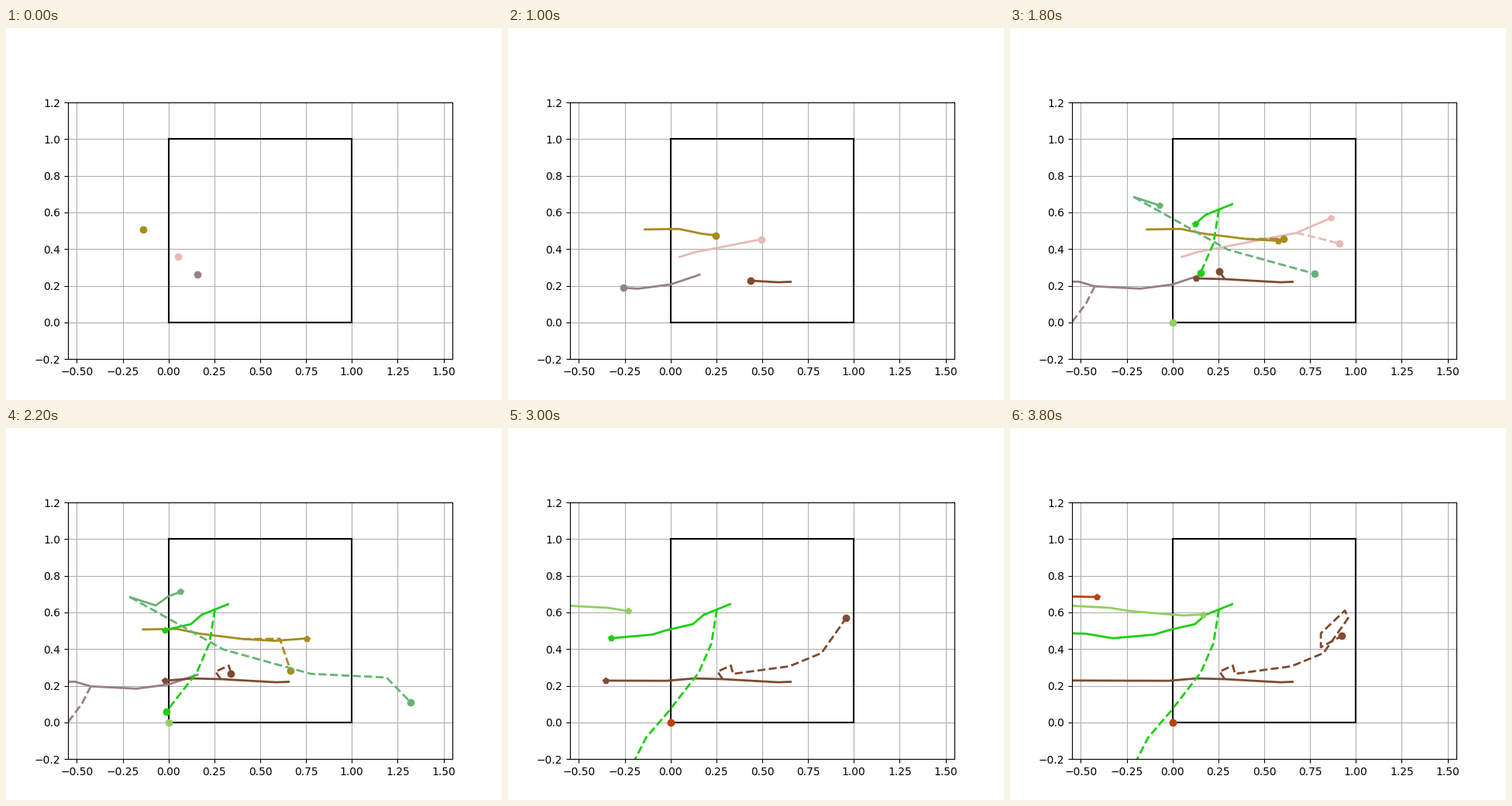
Write a matplotlib script that moves like this. It is 640 px wide and 480 px high and loops after 4 s.

```python
import numpy as np
import matplotlib.pyplot as plt
from matplotlib.animation import FuncAnimation

FRAMES, INTERVAL = 20, 200
FORK = 7                # last step before the forecast starts

fig, ax = plt.subplots(figsize=(6.4, 4.8), dpi=100)
fig.subplots_adjust(top=0.8)

# equal scale on both axes, centred on the unit square
box = ax.get_position()
half = 0.7 * (box.width * 6.4) / (box.height * 4.8)
ax.set_xlim(0.5 - half, 0.5 + half)
ax.set_ylim(-0.2, 1.2)
ax.grid(True)
for a, b in [((0, 1), (0, 0)), ((0, 1), (1, 1)), ((0, 0), (0, 1)), ((1, 1), (0, 1))]:
    ax.plot(a, b, color="black")


def trace(knots, first, last):
    """Positions at every step, at even speed between (step, x, y) knots."""
    t, x, y = zip(*knots)
    steps = np.arange(first, last + 1)
    return np.interp(steps, t, x), np.interp(steps, t, y)


class Walker:
    """A walked path (solid) and its forecast (dashed)."""

    def __init__(self, color, born, gone, path, forecast=()):
        self.born, self.gone, self.path = born, gone, path
        if born <= FORK:
            x, y = trace(path, FORK, FORK)
            self.forecast = [(FORK, x[0], y[0]), *forecast]
        else:
            self.forecast = [(born, 0, 0)]
        style = dict(color=color, lw=2, markevery=[-1], visible=False)
        self.solid, = ax.plot([0], [0], "-", **style)
        self.dashed, = ax.plot([0], [0], "--", marker="o", **style)

    def show(self, step):
        alive = self.born <= step < self.gone
        ahead = step > FORK
        self.solid.set_visible(alive)
        self.dashed.set_visible(alive and ahead)
        if alive:
            self.solid.set_data(*trace(self.path, self.born, step))
            self.solid.set_marker("p" if ahead else "o")
            self.dashed.set_data(*trace(self.forecast, FORK, max(step, FORK)))
        return [self.solid, self.dashed]


walkers = [
    Walker("#e6bab8", 0, 10,
           [(0, 0.05, 0.357), (1, 0.137, 0.384), (7, 0.675, 0.488), (9, 0.865, 0.57)],
           [(8, 0.758, 0.469), (9, 0.911, 0.43)]),
    Walker("#988089", 0, 12,
           [(0, 0.158, 0.26), (2, 0, 0.207), (4, -0.176, 0.184),
            (7, -0.424, 0.197), (8, -0.51, 0.222), (11, -0.77, 0.222)],
           [(8, -0.472, 0.103), (11, -0.8, -0.335)]),
    Walker("#a88c1e", 0, 12,
           [(0, -0.14, 0.507), (2, 0.044, 0.51), (4, 0.17, 0.484),
            (7, 0.405, 0.455), (9, 0.578, 0.445), (11, 0.752, 0.458)],
           [(9, 0.607, 0.456), (11, 0.666, 0.281)]),
    Walker("#804a30", 2, FRAMES,
           [(2, 0.655, 0.2215), (3, 0.587, 0.219), (7, 0.285, 0.236),
            (9, 0.13, 0.24), (11, -0.022, 0.227), (15, -0.355, 0.228),
            (19, -0.66, 0.229)],
           [(9, 0.256, 0.277), (10, 0.329, 0.31), (11, 0.341, 0.265),
            (13, 0.648, 0.306), (14, 0.823, 0.378), (15, 0.958, 0.569),
            (16, 0.94, 0.61), (17, 0.809, 0.486), (18, 0.809, 0.41),
            (19, 0.924, 0.472)]),
    Walker("#1ece14", 6, FRAMES,
           [(6, 0.325, 0.645), (8, 0.181, 0.587), (9, 0.122, 0.536),
            (11, -0.022, 0.503), (12, -0.1, 0.479), (15, -0.325, 0.459),
            (17, -0.476, 0.484), (19, -0.63, 0.488)],
           [(8, 0.223, 0.431), (9, 0.154, 0.272), (11, -0.013, 0.057),
            (12, -0.132, -0.081), (13, -0.21, -0.233)]),
    Walker("#66b377", 7, 14,
           [(7, -0.209, 0.683), (9, -0.07, 0.638), (10, 0, 0.688),
            (11, 0.066, 0.712), (13, 0.19, 0.7)],
           [(8, 0.301, 0.397), (9, 0.776, 0.265), (10, 1.189, 0.245),
            (11, 1.321, 0.109), (13, 1.52, 0.169)]),
    Walker("#90d060", 8, FRAMES,
           [(8, -1.01, 0.645), (12, -0.565, 0.637), (14, -0.341, 0.625),
            (15, -0.23, 0.607), (18, 0.06, 0.583), (19, 0.164, 0.589)]),
    Walker("#b9430f", 15, FRAMES, [(15, -0.87, 0.693), (19, -0.412, 0.684)]),
]


def update(step):
    return [line for w in walkers for line in w.show(step)]


anim = FuncAnimation(fig, update, frames=FRAMES, interval=INTERVAL,
                     repeat=True, repeat_delay=0, blit=False)
plt.show()
```
